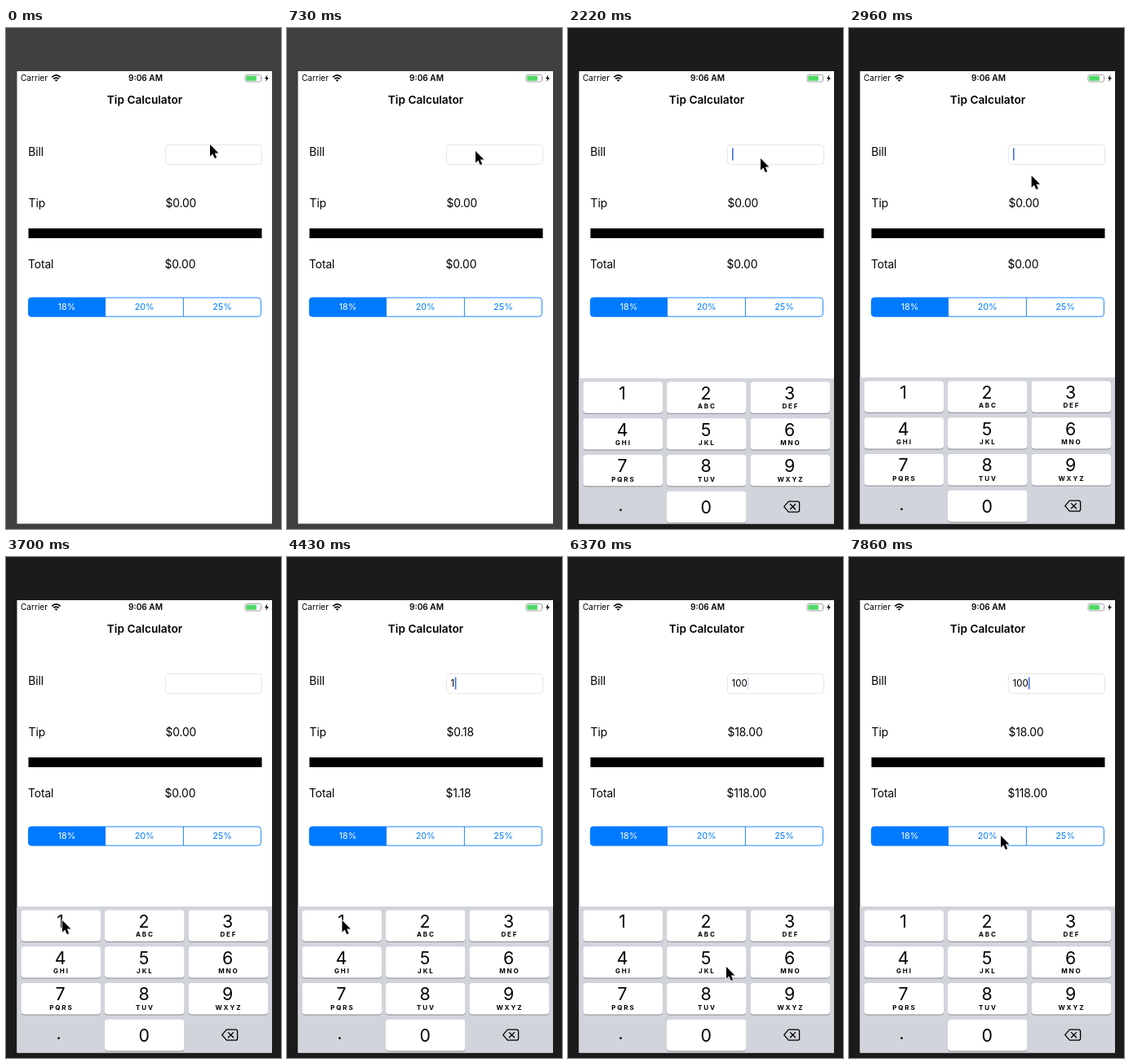
Recreate the animation shown at these times as an HTML page. Size 337 px wide and 615 px high, loop 8000 ms.

```html
<!DOCTYPE html>
<html lang="en">
<head>
<meta charset="utf-8">
<title>Tip Calculator</title>
<style>
html, body { margin: 0; width: 100%; height: 100%; overflow: hidden; }
svg { display: block; width: 337px; height: 615px; font-family: Inter, "Open Sans", sans-serif; }
.label { font-size: 13.8px; letter-spacing: -.1px; }
.title { font-size: 13.7px; font-weight: 600; }
.status { font-size: 10.1px; }
.seg { font-size: 10.8px; fill: #007aff; }
.mid { text-anchor: middle; }
.digit { font-size: 21.3px; }
.letters { font-size: 8px; font-weight: 700; letter-spacing: 1.9px; }
</style>
</head>
<body>
<svg viewBox="0 0 337 615">
  <defs><clipPath id="screen"><rect x="13.5" y="53" width="312.5" height="555.5"/></clipPath></defs>
  <rect id="desk" width="337" height="615"/>
  <g clip-path="url(#screen)">
    <rect x="13" y="53" width="314" height="556" fill="#fff"/>

    <text class="status" x="18" y="65">Carrier</text>
    <g fill="none" stroke="#000" stroke-width="1.7">
      <path d="M56.3 60.3Q61.5 55.5 66.7 60.3M58.3 62.5Q61.5 59.6 64.7 62.5"/>
      <path d="M61.5 65.8L59.8 64Q61.5 62.7 63.2 64Z" fill="#000" stroke="none"/>
    </g>
    <text class="status mid" x="171" y="65" font-weight="600">9:06 AM</text>
    <rect x="293" y="57.5" width="19.5" height="8.5" rx="2" fill="none" stroke="#999" stroke-width=".9"/>
    <rect x="294.3" y="58.8" width="12.6" height="5.9" rx="1" fill="#4cd964"/>
    <path d="M313.6 60.3q1.4 1.4 0 2.9z" fill="#999"/>
    <path d="M320.4 57.3L317 62.3h2.2L318.2 66l3.7-5h-2.3z"/>
    <text class="title mid" x="170" y="93">Tip Calculator</text>

    <text class="label" x="27.3" y="157">Bill</text>
    <text class="label" x="27.6" y="220">Tip</text>
    <text class="label" x="27" y="295">Total</text>
    <rect x="195.3" y="143.4" width="118.2" height="24.2" rx="4" fill="#fff" stroke="#e2e2e2" stroke-width=".9"/>
    <text id="bill" x="200.6" y="159.3" font-size="11.5"></text>
    <rect id="caret" y="147.5" width="1.6" height="15" fill="#426bf2"/>
    <text id="tip" class="label" x="195.4" y="220"></text>
    <rect x="27.5" y="246" width="286" height="12"/>
    <text id="total" class="label" x="194.6" y="295"></text>

    <path d="M122 331H31a3.6 3.6 0 0 0-3.6 3.6v16a3.6 3.6 0 0 0 3.6 3.6h91z" fill="#007aff"/>
    <rect x="27.4" y="331" width="285" height="23.2" rx="3.6" fill="none" stroke="#007aff" stroke-width=".9"/>
    <path d="M217.4 331v23" stroke="#007aff" stroke-width=".9"/>
    <text class="seg mid" x="74.5" y="346.4" style="fill:#fff">18%</text>
    <text class="seg mid" x="169.7" y="346.4">20%</text>
    <text class="seg mid" x="265" y="346.4">25%</text>

    <g id="pad">
      <rect x="13" y="429" width="314" height="186" fill="#d1d4da"/>
      <g id="keys"></g>
      <text class="digit mid" x="64.6" y="592">.</text>
      <path d="M270.3 580.2h11a2.3 2.3 0 0 1 2.3 2.3v8.4a2.3 2.3 0 0 1-2.3 2.3h-11l-5.6-6.5zM272.4 583.6l6.2 6.2m0-6.2l-6.2 6.2"
        fill="none" stroke="#000" stroke-width="1.3" stroke-linejoin="round" stroke-linecap="round"/>
    </g>
  </g>
  <g id="cursor">
    <path d="M0 0V14.6L3.3 11.5L5.7 17L8.2 15.9L5.8 10.6H10.4Z" transform="translate(.5 1.2)" fill="#000" opacity=".2"/>
    <path d="M0 0V14.6L3.3 11.5L5.7 17L8.2 15.9L5.8 10.6H10.4Z" stroke="#fff" stroke-width="1.6" paint-order="stroke"/>
  </g>
</svg>
<script>
const $ = id => document.getElementById(id);
const LOOP = 8000, TICK = LOOP / 54;

// Keypad: digits 1-9 in three rows, 0 in the middle of the fourth
const letters = ['', '', 'ABC', 'DEF', 'GHI', 'JKL', 'MNO', 'PQRS', 'TUV', 'WXYZ'];
$('keys').innerHTML = letters.map((word, n) => {
  const cell = n ? n - 1 : 10;
  const x = 18.5 + cell % 3 * 102.5, y = 433.4 + Math.floor(cell / 3) * 44.8, mid = x + 48.8;
  return `<rect x="${x}" y="${y + 1}" width="97.5" height="38.4" rx="4" fill="#898b90"/>
    <rect id="key${n}" x="${x}" y="${y}" width="97.5" height="38.4" rx="4"/>
    <text class="digit mid" x="${mid - .7}" y="${y + (n ? 21.4 : 26.8)}">${n}</text>
    <text class="letters mid" x="${mid + .6}" y="${y + 32.6}">${word}</text>`;
}).join('');

// Pointer stops: [tick, x, y]
const stops = [
  [0, 250, 143], [5, 231, 151], [11, 231, 151], [12, 236, 172], [13, 240, 186], [14, 238, 171],
  [15, 236, 160], [19, 236, 160], [25, 69, 446], [26, 67.5, 446], [29, 67.5, 446], [33, 167, 583],
  [42, 167, 583], [43, 194, 503], [45, 201, 390], [47, 196, 346], [48, 196, 346], [51, 186, 342], [54, 186, 342]
];
const resets = [12, 28, 36, 39];
const presses = [[28, 1], [36, 0], [38, 0]];

function pointer(k) {
  const i = stops.findIndex(s => s[0] > k);
  const [ka, xa, ya] = stops[i - 1], [kb, xb, yb] = stops[i];
  const u = (k - ka) / (kb - ka), e = u * u * (3 - 2 * u);
  return [xa + (xb - xa) * e, ya + (yb - ya) * e];
}

function caretAlpha(k) {
  const since = k - resets.filter(r => r <= k).pop();
  if (isNaN(since)) return 0;
  return since < 4 ? 1 : [.25, 0, 0, 0, 1, 1][(since - 4) % 6];
}

function padShift(k) {
  const s = Math.max(0, (k * TICK - 1789) * .017);
  return 180 * (1 + s) * Math.exp(-s);
}

function draw(now) {
  // The screen refreshes in even ticks
  const k = Math.min(53, Math.floor((now % LOOP + 14) / TICK));
  const bill = k < 29 ? '' : k < 37 ? '1' : k < 39 ? '10' : '100';
  $('desk').setAttribute('fill', k < 10 ? '#404040' : '#1b1b1b');
  $('bill').textContent = bill;
  $('tip').textContent = '$' + (bill * .18).toFixed(2);
  $('total').textContent = '$' + (bill * 1.18).toFixed(2);
  $('caret').setAttribute('x', [201, 205.8, 212.8, 219.9][bill.length]);
  $('caret').setAttribute('opacity', caretAlpha(k));
  $('pad').setAttribute('transform', `translate(0 ${padShift(k)})`);
  const down = presses.find(p => p[0] === k);
  letters.forEach((_, n) => $('key' + n).setAttribute('fill', down && down[1] === n ? '#b8c5d1' : '#fff'));
  $('cursor').setAttribute('transform', `translate(${pointer(k)})`);
}

let start;
function loop(now) {
  start ??= now;
  draw(now - start);
  requestAnimationFrame(loop);
}
draw(0);
requestAnimationFrame(loop);
</script>
</body>
</html>
```
